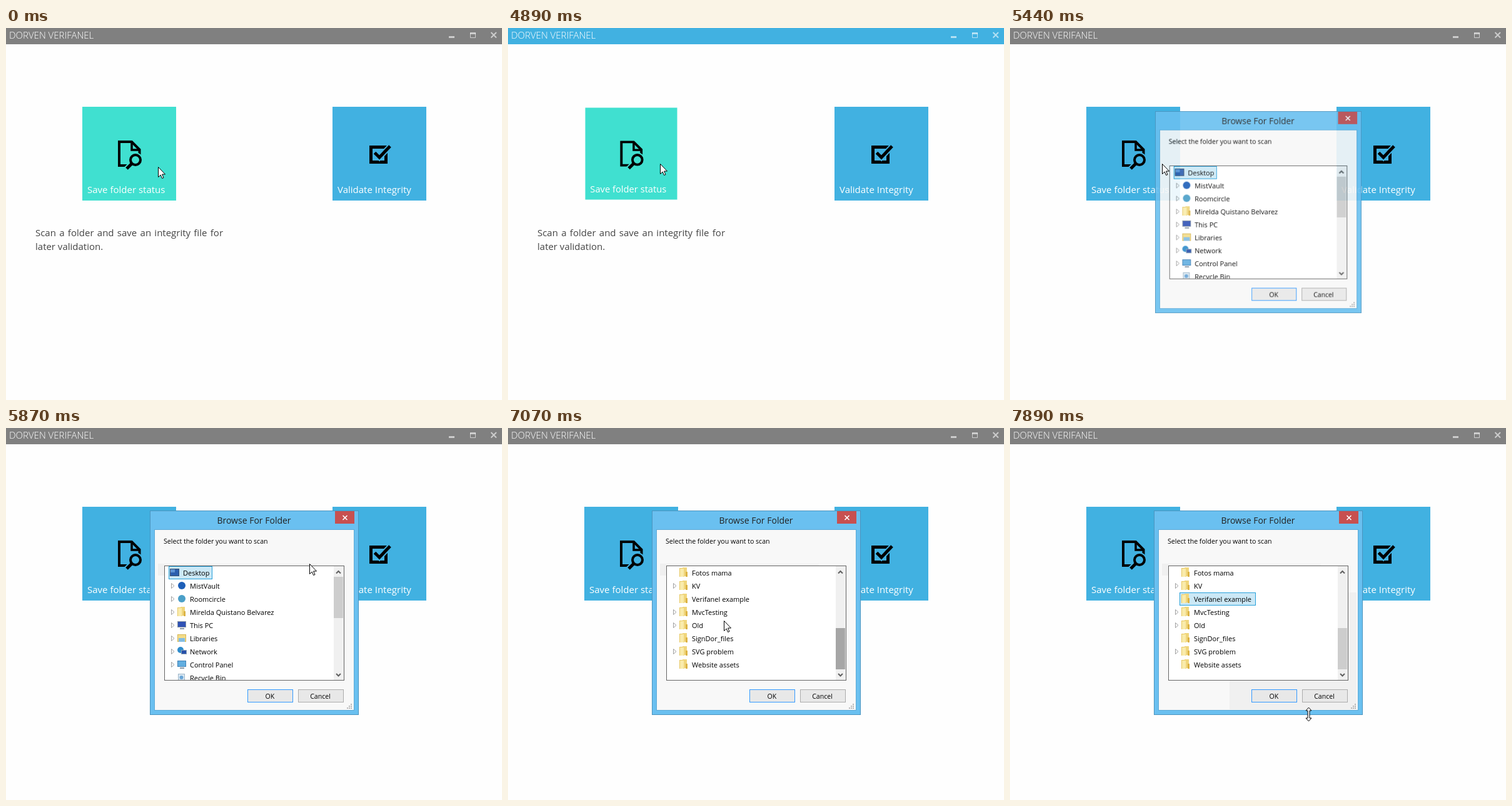
An HTML page with a canvas for the animation above (8000 ms loop, 793 by 595 pixels).

```html
<!DOCTYPE html>
<html lang="en">
<head>
<meta charset="utf-8">
<title>Folder integrity</title>
<style>
html, body { margin: 0; width: 100%; height: 100%; overflow: hidden; background: #fefefe; }
canvas { display: block; }
</style>
</head>
<body>
<canvas id="stage" width="793" height="595"></canvas>
<script>
const LOOP = 8000, BLUE = '#41b1e1', TEAL = '#40e0d0', GREY = '#808080';
const stage = document.getElementById('stage');
const layer = Object.assign(document.createElement('canvas'), { width: 793, height: 595 });
const screenCtx = stage.getContext('2d'), layerCtx = layer.getContext('2d');
let g = screenCtx;

// [label, icon, expandable]
const rows = [
  ['Desktop', 'desk'], ['MistVault', '#1d5fb8', 1], ['Roomcircle', '#4a9fc8', 1],
  ['Mirelda Quistano Belvarez', 'folder', 1], ['This PC', 'screen', 1],
  ['Libraries', 'library', 1], ['Network', 'net', 1], ['Control Panel', 'panel', 1],
  ['Recycle Bin', 'bin'], ['Backup', 'folder'], ['Drivers', 'folder'],
  ['Fotos mama', 'folder'], ['KV', 'folder', 1], ['Verifanel example', 'folder'],
  ['MvcTesting', 'folder', 1], ['Old', 'folder', 1], ['SignDor_files', 'folder'],
  ['SVG problem', 'folder', 1], ['Website assets', 'folder']
];
const EXAMPLE = 13;

// [start time, value...]; each pose holds until the next
const pointer = [
  [0, 243, 222], [120, 243, 217], [5710, 257, 217], [5870, 485, 217], [6000, 512, 258],
  [6140, 522, 272], [6410, 522, 313], [6540, 522, 354], [6680, 522, 370],
  [6830, 490, 357], [6950, 410, 329], [7070, 345, 308], [7220, 334, 279, 'hand'],
  [7610, 351, 314], [7760, 430, 404], [7890, 477.5, 458, 'resize']
];
const scrolls = [[0, 0], [6410, 6], [6540, 11]];
const thumbs = [[0, '#cdcdcd'], [6140, '#a6a6a6'], [6260, '#606060'], [6830, '#a6a6a6'], [7220, '#cdcdcd']];
// opacity, scale
const opening = [[0, 0, 1], [5320, .45, .965], [5440, .9, .988], [5590, 1, 1]];
const at = (keys, t) => keys.findLast(k => k[0] <= t).slice(1);

const shapes = {
  arrow: new Path2D('M.5 .5V16.5L4.2 13L6.6 18.5L9 17.5L6.6 12H11.5Z'),
  hand: new Path2D('M4 15V2Q5.5-.5 7 2V8Q9 6.5 10 8.5Q12 7 13 9.5Q15 8.5 15 11V16Q14 19 13 22H5Q4 18 .5 14Q-.5 11 2 12Z'),
  resize: new Path2D('M0-11L4.5-6H1.5V6H4.5L0 11L-4.5 6H-1.5V-6H-4.5Z')
};

function box(x, y, w, h, fill, border) {
  g.fillStyle = fill;
  g.fillRect(x, y, w, h);
  if (!border) return;
  g.strokeStyle = border;
  g.lineWidth = 1;
  g.strokeRect(x + .5, y + .5, w - 1, h - 1);
}

function text(s, x, y, size, color, align = 'left', weight = 400) {
  g.font = `${weight} ${size}px "Open Sans", "Noto Sans", sans-serif`;
  g.textAlign = align;
  g.fillStyle = color;
  g.fillText(s, x, y);
}

function line(d, color, width) {
  g.strokeStyle = color;
  g.lineWidth = width;
  g.stroke(new Path2D(d));
}

function disc(x, y, r, color) {
  g.fillStyle = color;
  g.beginPath();
  g.arc(x, y, r, 0, 7);
  g.fill();
}

function justify(s, x, y, width, size, color) {
  const words = s.split(' ');
  g.font = `${size}px "Open Sans", "Noto Sans", sans-serif`;
  const widths = words.map(w => g.measureText(w).width);
  const gap = (width - widths.reduce((a, b) => a + b)) / (words.length - 1);
  words.forEach((w, i) => {
    text(w, x, y, size, color);
    x += widths[i] + gap;
  });
}

function titleBar(color) {
  box(0, 0, 793, 26, color);
  text('DORVEN VERIFANEL', 5, 17, 15, '#fff', 'left', 300);
  const tint = 'rgba(255,255,255,.6)';
  box(708, 13, 9, 3, tint);
  line('M742.5 8V15.5H750.5V8', tint, 1);
  box(742, 7, 9, 3, tint);
  line('M775.5 7L784 15.5M784 7L775.5 15.5', tint, 2);
}

function tile(x, color, label, icon, pressed, weight) {
  g.save();
  g.translate(x + 75, 201);
  if (pressed) g.scale(.98, .98);
  g.translate(-75, -75);
  box(0, 0, 150, 150, color);
  icon(color);
  text(label, 8, 138, 15, '#fff', 'left', weight);
  g.restore();
}

function scanIcon(color) {
  line('M76 94H59V56H79L91.5 68.5V80', '#000', 4);
  line('M79 56V69H92', '#000', 3.5);
  line('M85 85L70 100', color, 9);
  disc(85, 85, 12, color);
  line('M79 91L71 99', '#000', 5);
  line('M93 85A8 8 0 1 1 77 85A8 8 0 1 1 93 85Z', '#000', 4);
}

function checkIcon(color) {
  line('M61.5 64.5H85.5V88.5H61.5Z', '#000', 5);
  line('M67.5 73.5L75 81L93 62', color, 9);
  line('M67.5 73.5L75 81L92 63', '#000', 5);
}

function folder(x, y) {
  box(x + 1, y + 1, 8, 14, '#e8c863');
  box(x + 6, y, 7, 14, '#f0d67c');
  box(x + 2, y + 2, 6, 13, '#f9ebab');
  box(x + 11, y + 7, 3, 8, '#dcb345');
}

function monitor(x, y, fill, border) {
  box(x + 1, y + 2, 14, 10, fill, border);
  box(x + 5, y + 13, 7, 2, '#8b9aa8');
}

function rowIcon(kind, x, y) {
  if (kind === 'folder') folder(x, y);
  else if (kind === 'desk') {
    box(x, y + 2, 15, 12, '#2d5fae', '#37506f');
    box(x + 1, y + 3, 7, 5, '#5f93d3');
  } else if (kind === 'screen') monitor(x, y, '#2f52b5', '#8795a5');
  else if (kind === 'panel') monitor(x, y, '#62aee0', '#4281b5');
  else if (kind === 'library') {
    box(x + 1, y + 2, 14, 12, '#f3dc88', '#d7b653');
    box(x + 3, y + 8, 10, 6, '#83bde3');
  } else if (kind === 'net') {
    disc(x + 6, y + 6, 5, '#2f8ccb');
    box(x + 7, y + 6, 9, 7, '#274faa', '#8da2b5');
  } else if (kind === 'bin') {
    box(x + 2, y + 2, 11, 13, '#dbe8f2', '#9eb6c9');
    disc(x + 7.5, y + 8, 3, '#69a5d7');
  } else disc(x + 8, y + 8, 6, kind);
}

function list(t) {
  const [scroll] = at(scrolls, t), [thumb] = at(thumbs, t);
  box(253, 220, 288, 184, '#fff', '#646464');
  g.save();
  g.beginPath();
  g.rect(254, 221, 286, 182);
  g.clip();
  rows.forEach(([label, icon, expandable], i) => {
    const y = 221 + 21 * (i - scroll), shift = i ? 0 : -11;
    const selected = i === (t < 7490 ? 0 : EXAMPLE);
    const hovered = i === EXAMPLE && t >= 7220;
    if (selected || hovered) {
      box(271 + shift, y, i ? 122 : 70, 21, selected ? '#cbe8f6' : '#e5f3fb', selected ? '#26a0da' : '#70c0e7');
    }
    rowIcon(icon, 273 + shift, y + 2);
    if (expandable) line(`M264.5 ${y + 6.5}V${y + 14.5}L269 ${y + 10.5}Z`, '#a0a0a0', 1);
    text(label, 294 + shift, y + 15, 11, '#000');
  });
  box(524, 221, 16, 182, '#f0f0f0');
  box(524, 238 + 82 * scroll / 11, 15, 66, thumb);
  line('M528 232.5L531.5 229L535 232.5M528 393L531.5 396.5L535 393', '#606060', 2);
  g.restore();
}

function dialog(t) {
  box(230, 132, 334, 327, '#6ac0f0', '#4b94bf');
  text('Browse For Folder', 396.5, 153, 14, '#222', 'center');
  box(526, 133, 31, 20, '#c75050');
  line('M538.5 140L545.5 147M545.5 140L538.5 147', '#fff', 1.6);
  box(237, 162, 320, 290, '#f8f8f8', '#5caad7');
  if (t >= 5870) box(243, 217, 254, 19, '#f0f0f0');
  if (t >= 7760) {
    box(541, 263, 13, 141, '#f0f0f0');
    box(351, 404, 203, 46, '#f0f0f0');
  }
  text('Select the folder you want to scan', 252, 185, 10.6, '#000');
  list(t);
  box(386, 418, 73, 21, '#e8e8e8', '#3399ff');
  box(467, 418, 73, 21, '#e8e8e8', '#acacac');
  text('OK', 422, 433, 10.6, '#000', 'center');
  text('Cancel', 502.5, 433, 10.6, '#000', 'center');
  for (let i = 0; i < 3; i++) {
    for (let j = 2 - i; j < 3; j++) box(545 + 3 * j, 441 + 3 * i, 2, 2, '#b4b4b4');
  }
}

function tooltip() {
  box(340, 308, 203, 20, 'rgba(0,0,0,.18)');
  box(339, 307, 203, 20, 'rgba(0,0,0,.25)');
  box(337, 305, 203, 20, '#fff', '#767676');
  text('Date created: 16/02/2015 12:16 p. m.', 343, 319, 11, '#575757');
}

function cursor(x, y, kind = 'arrow') {
  g.save();
  g.translate(x, y);
  g.fillStyle = '#fff';
  g.strokeStyle = '#000';
  g.lineWidth = 1;
  g.fill(shapes[kind]);
  g.stroke(shapes[kind]);
  if (kind === 'hand') line('M7 8V12M10 9V12M13 10V13', '#000', 1);
  g.restore();
}

function draw(t) {
  const pressed = t >= 4890 && t < 5320;
  box(0, 0, 793, 595, '#fefefe');
  titleBar(pressed ? BLUE : GREY);
  tile(122, t < 5320 ? TEAL : BLUE, 'Save folder status', scanIcon, pressed, pressed && t < 5050 ? 500 : 400);
  tile(522, BLUE, 'Validate Integrity', checkIcon);
  if (t < 5320) {
    justify('Scan a folder and save an integrity file for', 47, 333, 300, 15, '#444');
    text('later validation.', 47, 355, 15, '#444');
  } else {
    const [alpha, scale] = at(opening, t);
    g = layerCtx;
    g.clearRect(0, 0, 793, 595);
    dialog(t);
    g = screenCtx;
    g.save();
    g.globalAlpha = alpha;
    g.translate(397, 214);
    g.scale(scale, scale);
    g.drawImage(layer, -397, -214);
    g.restore();
  }
  if (t >= 7350 && t < 7490) tooltip();
  cursor(...at(pointer, t));
}

const start = performance.now();
function tick() {
  draw((performance.now() - start) % LOOP);
  requestAnimationFrame(tick);
}
tick();
</script>
</body>
</html>
```
